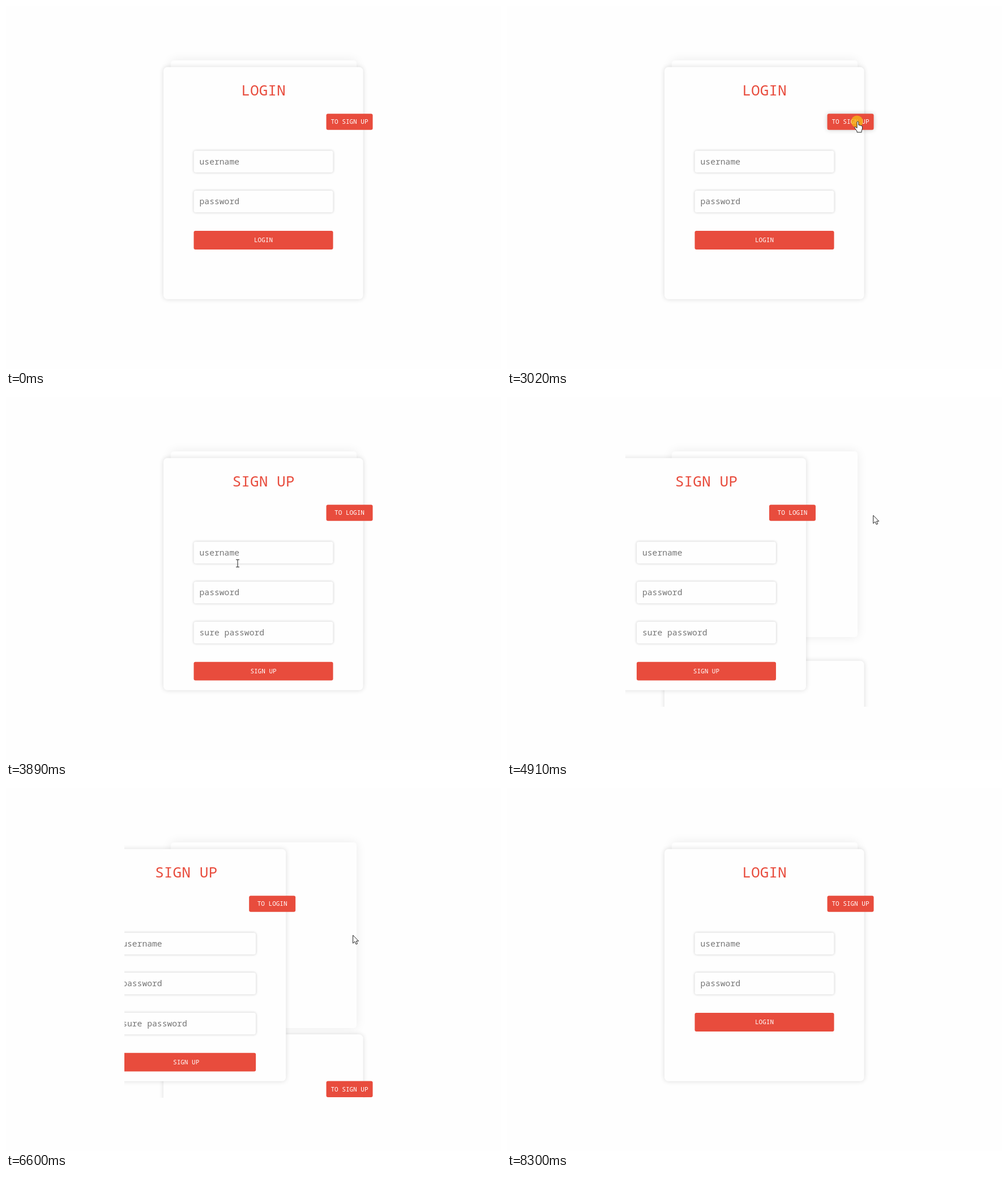
Animation, 874 px wide and 641 px high, one loop 9080 ms. Source, as an HTML page with a canvas:

```html
<!DOCTYPE html>
<html lang="en">
<head>
<meta charset="utf-8">
<title>Login and sign up</title>
<style>
  html, body { margin: 0; width: 100%; height: 100%; overflow: hidden; background: #fefefe; }
  canvas { display: block; }
</style>
</head>
<body>
<canvas id="stage" width="874" height="641"></canvas>
<script>
const ctx = document.getElementById('stage').getContext('2d');
const LOOP = 9080, SLIDE = 500, ENTER = 220, LEAVE = 8300;
const PAPER = '#fefefe', RED = '#e84c3d', GREY = '#757575';
const FONT = '"Noto Sans Mono", "DejaVu Sans Mono", monospace';

// Each release swaps the forms
const CLICKS = [
  { down: 3020, up: 3200 }, { down: 4800, up: 4831 },
  { down: 6140, up: 6385 }, { down: 7300, up: 7367 }
];

// Pointer trips: each starts where the last one ended, bow and sway bend the way
const START = [815, 632], HOME = [618, 204];
const TRIPS = [
  { t: ENTER, span: 900, to: HOME },
  { t: 3200, span: 1630, to: HOME, bow: [-190, 95], sway: -53 },
  { t: 4831, span: 1079, to: HOME, bow: [25, 94], sway: 51 },
  { t: 6385, span: 765, to: [630, 198], bow: [-10, 95] },
  { t: 7367, span: 473, to: [708, 309] },
  { t: 7920, span: 300, to: [779, 531] }
];

const FIELD_GAP = 70.6;
const TOGGLE = [566, 190.8, 82, 28.5];
const fieldBox = i => [332, 256 + i * FIELD_GAP, 246, 38.5];
const submitBox = n => [332, 256.4 + n * FIELD_GAP, 246, 32.8];

const LOGIN = { title: 'LOGIN', toggle: 'TO SIGN UP', fields: ['username', 'password'] };
const SIGNUP = { title: 'SIGN UP', toggle: 'TO LOGIN', fields: ['username', 'password', 'sure password'] };

const mix = (a, b, u) => a + (b - a) * u;
const smooth = u => u * u * (3 - 2 * u);

// cubic-bezier(.25, .1, .25, 1)
function ease(u) {
  if (u <= 0) return 0;
  if (u >= 1) return 1;
  let lo = 0, hi = 1, s = 0.5;
  for (let i = 0; i < 20; i++) {
    s = (lo + hi) / 2;
    if (0.75 * s * (1 - s) + s ** 3 < u) lo = s; else hi = s;
  }
  return 0.3 * s * (1 - s) ** 2 + 3 * s * s * (1 - s) + s ** 3;
}

// 0 = login shown, 1 = sign up shown
function swapAmount(t) {
  const i = CLICKS.findLastIndex(c => t >= c.up);
  if (i < 0) return 0;
  const e = ease((t - CLICKS[i].up) / SLIDE);
  return i % 2 ? 1 - e : e;
}

function pointerAt(t) {
  if (t < ENTER || t >= LEAVE) return null;
  const i = TRIPS.findLastIndex(trip => t >= trip.t);
  const { t: t0, span, to, bow = [0, 0], sway = 0 } = TRIPS[i];
  const from = i ? TRIPS[i - 1].to : START;
  const u = Math.min(1, (t - t0) / span), arc = Math.sin(Math.PI * u);
  return {
    x: mix(from[0], to[0], smooth(u)) + bow[0] * arc + sway * Math.sin(2 * Math.PI * u),
    y: mix(from[1], to[1], smooth(u)) + bow[1] * arc * arc
  };
}

const inside = (p, [x, y, w, h]) => p && p.x >= x && p.x <= x + w && p.y >= y && p.y <= y + h;

function box([x, y, w, h], r, fill, blur = 0, alpha = 0) {
  ctx.save();
  ctx.shadowBlur = blur;
  ctx.shadowColor = `rgba(0,0,0,${alpha})`;
  ctx.fillStyle = fill;
  ctx.beginPath();
  ctx.roundRect(x, y, w, h, r);
  ctx.fill();
  ctx.restore();
}

function text(str, x, y, size, color, align = 'center') {
  ctx.font = `500 ${size}px ${FONT}`;
  ctx.textAlign = align;
  ctx.fillStyle = color;
  ctx.fillText(str, x, y);
}

function button(label, rect, pointer) {
  const [x, y, w, h] = rect;
  box(rect, 3, RED, 8, inside(pointer, rect) ? 0.2 : 0);
  text(label, x + w / 2, y + h / 2 + 3.9, 11, '#fff');
}

function drawForm(form, dx, dy, pointer) {
  const local = pointer && { x: pointer.x - dx, y: pointer.y - dy };
  ctx.save();
  ctx.translate(dx - 0.5, dy - 0.5);
  box([278.5, 108.3, 352.6, 410], 7, PAPER, 9, 0.14);
  text(form.title, 455, 158.6, 26.24, RED);
  form.fields.forEach((name, i) => {
    const rect = fieldBox(i);
    box(rect, 4, PAPER, 4, 0.22);
    text(name, 342, rect[1] + 24, 14.7, GREY, 'left');
  });
  button(form.title, submitBox(form.fields.length), local);
  button(form.toggle, TOGGLE, local);
  ctx.restore();
}

function pointerKind(p, swap) {
  if (swap > 0 && swap < 1) return 'arrow';
  const { fields } = swap ? SIGNUP : LOGIN;
  if (inside(p, TOGGLE) || inside(p, submitBox(fields.length))) return 'hand';
  return fields.some((_, i) => inside(p, fieldBox(i))) ? 'beam' : 'arrow';
}

const POINTERS = {
  arrow: new Path2D('M0 0V14.2L3.4 11.2L5.5 16L7.9 15L5.8 10.3H10Z'),
  hand: new Path2D('M0 1Q1.4 -2 2.8 1V6L8 7.5Q9.4 8 9.4 9V13L8 16.5V19H0V17L-4.5 10.8Q-4 8 0 11.5Z'),
  beam: new Path2D('M-3 -6.5H3M0 -6.5V6.5M-3 6.5H3')
};

function drawPointer({ x, y }, kind) {
  ctx.save();
  ctx.translate(x, y);
  ctx.lineJoin = 'round';
  ctx.strokeStyle = '#222';
  ctx.fillStyle = '#fff';
  ctx.fill(POINTERS[kind]);
  ctx.stroke(POINTERS[kind]);
  ctx.restore();
}

function draw(t) {
  const pointer = pointerAt(t), swap = swapAmount(t);
  ctx.fillStyle = PAPER;
  ctx.fillRect(0, 0, 874, 641);
  box([291, 96, 328, 328], 5, PAPER, 18, 0.08);

  ctx.save();
  ctx.beginPath();
  ctx.rect(209, 55, 492, 492);
  ctx.clip();
  if (swap < 1) drawForm(LOGIN, 0, 451 * swap, pointer);
  if (swap > 0) drawForm(SIGNUP, -497 * (1 - swap), 0, pointer);
  ctx.restore();

  if (!pointer) return;
  if (CLICKS.some(c => t >= c.down && t < c.up)) {
    ctx.fillStyle = 'rgba(244,180,22,.8)';
    ctx.beginPath();
    ctx.arc(pointer.x, pointer.y, 10.5, 0, Math.PI * 2);
    ctx.fill();
  }
  drawPointer(pointer, pointerKind(pointer, swap));
}

const born = performance.now();
function tick() {
  draw((performance.now() - born) % LOOP);
  requestAnimationFrame(tick);
}
tick();
</script>
</body>
</html>
```
